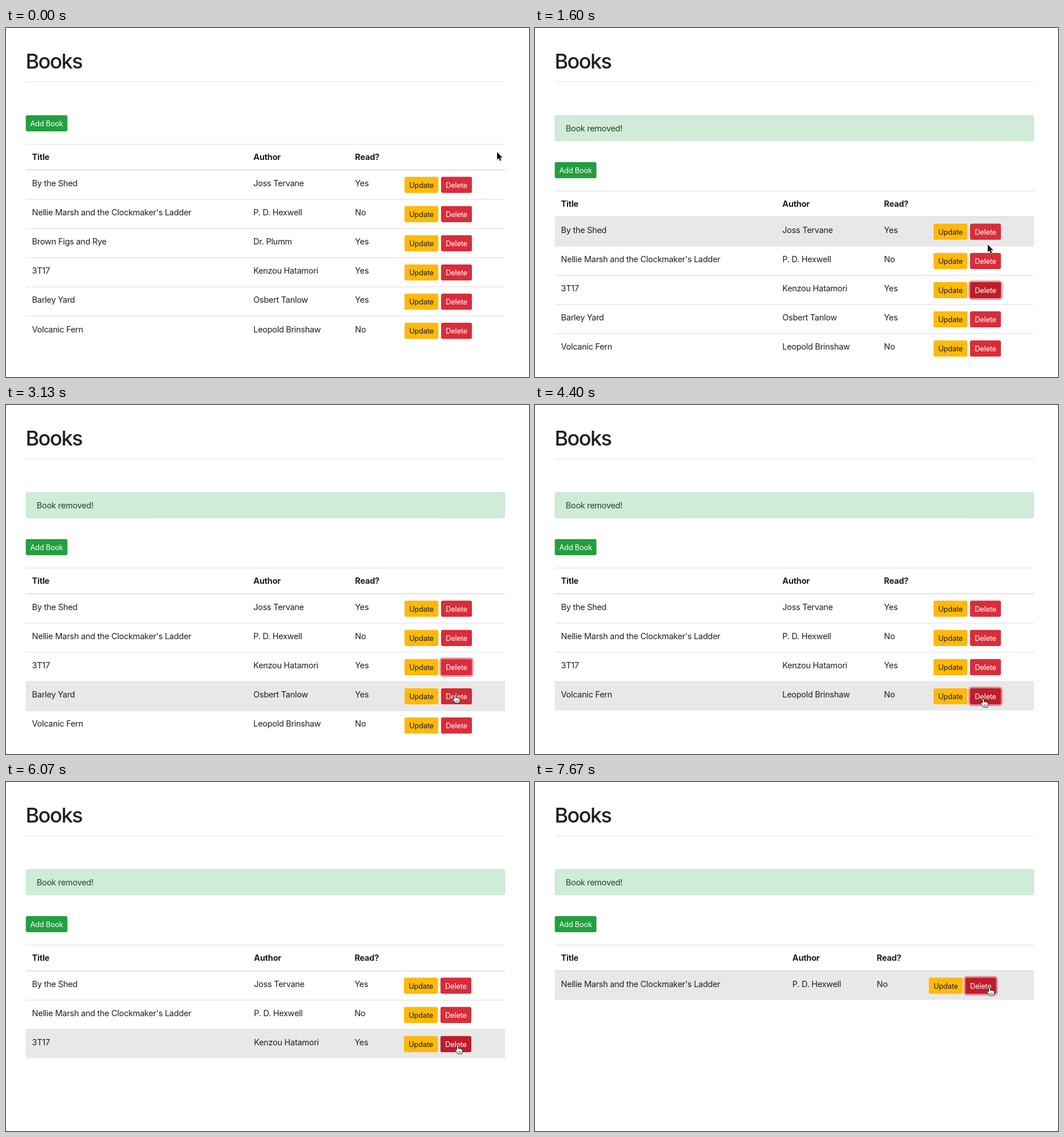
An HTML page for the animation above (8200 ms loop, 916 by 611 pixels).

```html
<!DOCTYPE html>
<html lang="en">
<head>
<meta charset="utf-8">
<title>Books</title>
<style>
  html, body { margin: 0; width: 100%; height: 100%; overflow: hidden; background: #fff; }
  svg { display: block; font-family: Inter, "Liberation Sans", sans-serif; }
  text { font-size: 14.5px; letter-spacing: -0.02em; fill: #1b1f23; white-space: pre; }
  .h1 { font-size: 36px; font-weight: 500; letter-spacing: -0.043em; }
  .th { font-weight: 700; letter-spacing: -0.015em; }
  .btn { font-size: 12.8px; letter-spacing: -0.015em; text-anchor: middle; }
  .light { fill: #fff; }
  .alert { fill: #154d22; }
</style>
</head>
<body>
<svg id="stage" width="916" height="611" viewBox="0 0 916 611"></svg>
<script>
const STEP = 200 / 3, LOOP = 8200;
const LEFT = 34.6, RIGHT = 874, ROW = 51.1, FADE = 2.2;
const RED = [217, 45, 58], DARK = [190, 29, 42];

const books = [
  ["By the Shed", "Joss Tervane", "Yes"],
  ["Nellie Marsh and the Clockmaker's Ladder", "P. D. Hexwell", "No"],
  ["Brown Figs and Rye", "Dr. Plumm", "Yes"],
  ["3T17", "Kenzou Hatamori", "Yes"],
  ["Barley Yard", "Osbert Tanlow", "Yes"],
  ["Volcanic Fern", "Leopold Brinshaw", "No"]
];

// Times below are counted in screen ticks of STEP ms.
// Each stage: start, remaining books, x of author, read and update columns.
const stages = [
  [0, [0, 1, 2, 3, 4, 5], 433.3, 611.3, 698],
  [24, [0, 1, 3, 4, 5], 433.3, 611.3, 698],
  [57, [0, 1, 3, 5], 433.3, 611.3, 698],
  [76, [0, 1, 3], 434.3, 610.4, 697],
  [92, [0, 1], 448, 600.8, 691.6],
  [113, [1], 450.8, 598.6, 689.8]
].map(([start, list, author, read, update]) =>
  ({ start, list, author, read, update, shift: start ? 82 : 0 }));

// Focus rings: row slot, start, end
const rings = [[2, 21.5, 56.5], [3, 52.5, 76], [2, 90.6, 92], [0, 109.5, 200]];

// Pointer stops: tick, x, y
const stops = [
  [1, 860, 217], [5, 877, 388], [7, 877, 388], [15, 795, 380], [18, 793, 379],
  [39, 793, 379], [40, 791, 380], [46, 787, 488], [47, 786.5, 507], [52, 785, 508],
  [56, 785, 508], [66, 785, 514], [81, 785, 514], [91, 791, 461], [96, 791, 461],
  [109, 796, 359]
];

const clamp = v => Math.max(0, Math.min(1, v));
const stageAt = n => stages.filter(s => s.start <= n + 0.01).pop();
const rowTop = (s, i) => 248.6 + s.shift + i * ROW;

function pointer(n) {
  const i = stops.findIndex(s => s[0] > n);
  if (i < 0) return stops[stops.length - 1].slice(1);
  if (i === 0) return stops[0].slice(1);
  const [t0, x0, y0] = stops[i - 1], [t1, x1, y1] = stops[i];
  const u = (n - t0) / (t1 - t0), e = u * u * (3 - 2 * u);
  return [x0 + (x1 - x0) * e, y0 + (y1 - y0) * e];
}

function hit(n) {
  const s = stageAt(n), [x, y] = pointer(n);
  const i = Math.floor((y - rowTop(s, 0)) / ROW);
  if (i < 0 || i >= s.list.length || x < LEFT || x > RIGHT) return { row: -1 };
  const dy = y - rowTop(s, i) - 12, dx = x - s.update;
  const inside = dy >= 0 && dy <= 28.2;
  return {
    row: i,
    update: inside && dx >= 0 && dx <= 59.3,
    remove: inside && dx >= 64 && dx <= 118
  };
}

function pressed(slot, n) {
  if (slot === 2 && n >= 24 && n < 30.5) return true;
  const h = hit(n);
  return h.row === slot && !!h.remove;
}

// Linear colour fade: share of the recent past spent under the pointer
function darkness(slot, n) {
  const parts = 12;
  let sum = 0;
  for (let k = 0; k < parts; k++) {
    if (pressed(slot, Math.max(0, n - (k + 0.5) / parts * FADE))) sum++;
  }
  return sum / parts;
}

function ringLevel(slot, n) {
  return Math.max(0, ...rings.filter(r => r[0] === slot).map(([, a, b]) =>
    Math.min(clamp((n - a) / 2), b === 200 ? 1 : 1 - clamp((n - b) / FADE))));
}

const rect = (x, y, w, h, fill, extra = "") =>
  `<rect x="${x}" y="${y}" width="${w}" height="${h}" fill="${fill}" ${extra}/>`;
const text = (x, y, str, cls = "") => `<text x="${x}" y="${y}" class="${cls}">${str}</text>`;
const line = (y, h, fill) => rect(LEFT, y, RIGHT - LEFT, h, fill);
const button = (x, y, w, fill, label, cls = "") =>
  rect(x, y, w, 28.2, fill, 'rx="2.8"') + text(x + w / 2, y + 18.9, label, "btn " + cls);

function ring(x, y, level) {
  if (level <= 0) return "";
  const w = 2.9 * level;
  return `<rect x="${x - w / 2}" y="${y - w / 2}" width="${54 + w}" height="${28.2 + w}" rx="${2.8 + w / 2}"
    fill="none" stroke="#dc3545" stroke-width="${w}" stroke-opacity="${0.5 * level}"/>`;
}

function tableRow(s, i, n) {
  const y = rowTop(s, i), [title, author, read] = books[s.list[i]];
  const d = darkness(i, n), red = RED.map((c, k) => Math.round(c + (DARK[k] - c) * d));
  const x = s.update + 64;
  return text(45.6, y + 28.4, title) + text(s.author, y + 28.4, author) + text(s.read, y + 28.4, read) +
    button(s.update, y + 12, 59.3, "#ffb90b", "Update") +
    ring(x, y + 12, ringLevel(i, n)) +
    button(x, y + 12, 54, `rgb(${red})`, "Delete", "light");
}

const arrow = `<path d="M0 0V13.6L3.1 10.8L5.2 15.6L7.4 14.6L5.4 10H9.5Z"
  fill="#111" stroke="#fff" stroke-width="1" stroke-linejoin="round" paint-order="stroke"/>`;
const hand = `<path d="M-1.5 8.4V1.3a1.4 1.4 0 0 1 2.8 0V6a1.4 1.4 0 0 1 2.7 .5a1.3 1.3 0 0 1 2.5 .7
  a1.2 1.2 0 0 1 2.2 .9V10.5C8.7 12.5 7.6 13 7.4 15H.4C0 13-2.5 11.5-4.3 8.8C-5.2 7.2-3.2 6.4-1.5 8.4Z"
  fill="#fff" stroke="#111" stroke-width="1" stroke-linejoin="round"/>
  <path d="M1.6 10V13M3.6 10V13M5.6 10V13" stroke="#111" stroke-width=".7"/>`;

function draw(n) {
  const s = stageAt(n), over = hit(n), [px, py] = pointer(n);
  let out = text(34.4, 71, "Books", "h1") + line(93.4, 1.2, "#e5e5e5");

  if (s.shift) {
    out += rect(35, 153, 838.6, 44.8, "#d0ebd7", 'rx="3.2" stroke="#c0e4c9" stroke-width=".9"') +
      text(53.8, 181, "Book removed!", "alert");
  }
  out += button(LEFT, 152.7 + s.shift, 73, "#239f3f", "Add Book", "light");

  if (over.row >= 0) out += line(rowTop(s, over.row), ROW - 0.2, "#e8e8e8");
  out += line(202.9 + s.shift, 1.2, "#dee2e6") + line(247.6 + s.shift, 1.8, "#dadee2");
  const head = 231.2 + s.shift;
  out += text(45.6, head, "Title", "th") + text(s.author, head, "Author", "th") +
    text(s.read, head, "Read?", "th");

  s.list.forEach((_, i) => {
    if (i) out += line(rowTop(s, i) - 0.4, 1.2, "#dee2e6");
    out += tableRow(s, i, n);
  });

  out += `<g transform="translate(${px} ${py})">${over.update || over.remove ? hand : arrow}</g>`;
  stage.innerHTML = out;
}

const stage = document.getElementById("stage");
const begin = performance.now();
let last = -1;

function tick(now) {
  const n = Math.floor((Math.max(0, now - begin) % LOOP + 4) / STEP) % 123;
  if (n !== last) draw(last = n);
  requestAnimationFrame(tick);
}
draw(last = 0);
requestAnimationFrame(tick);
</script>
</body>
</html>
```
